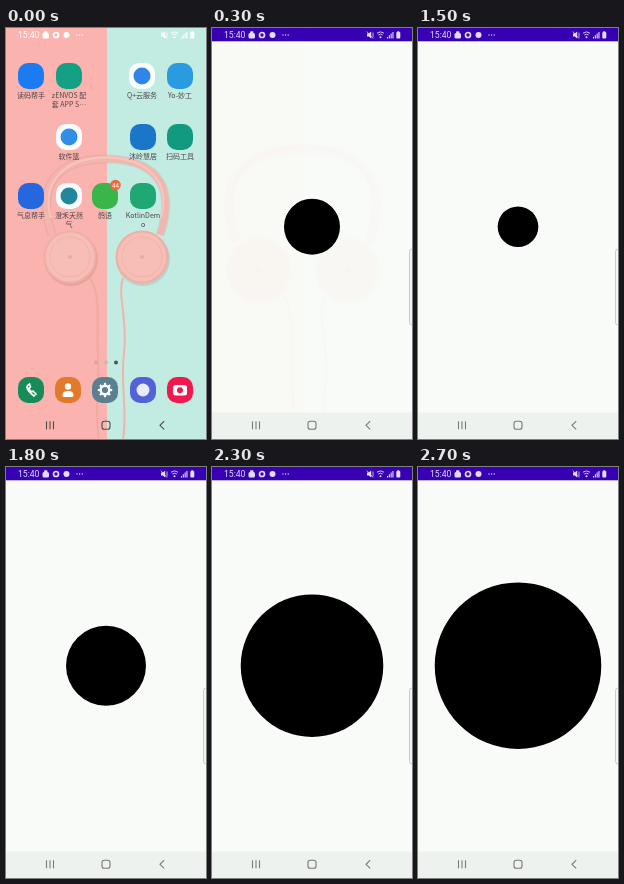
An HTML page with a canvas for the animation above (2.8 s loop, 200 px wide and 411 px high).

```html
<!DOCTYPE html>
<html lang="zh">
<head>
<meta charset="utf-8">
<title>Growing circle</title>
<style>
  html, body { margin: 0; width: 100%; height: 100%; overflow: hidden; background: #f8faf8; }
  canvas { display: block; width: 200px; height: 411px; }
</style>
</head>
<body>
<canvas id="stage"></canvas>
<script>
const W = 200, H = 411, LOOP = 2800, STEP = 100;
const SANS = '"Noto Sans CJK SC", "Noto Sans CJK", Roboto, sans-serif';
const canvas = document.getElementById('stage');
const ratio = window.devicePixelRatio || 1;
canvas.width = W * ratio;
canvas.height = H * ratio;
const g = canvas.getContext('2d');

// x, y, tile colour, colour of the round mark (if any), label lines
const APPS = [
  [25, 48, '#1b7cf2', null, ['读码帮手']],
  [63, 48, '#14a085', null, ['zENVOS 配', '套 APP S…']],
  [136, 48, '#fafcff', '#2f86e6', ['Q+云服务']],
  [174, 48, '#2a9be0', null, ['Yo-妙工']],
  [63, 109, '#fdfdfd', '#2f8fe8', ['软件篮']],
  [137, 109, '#1976c8', null, ['沐岭慧居']],
  [174, 109, '#129a80', null, ['扫码工具']],
  [25, 168, '#2467df', null, ['气息帮手']],
  [63, 168, '#f6fbfb', '#23869a', ['澄禾天然', '气']],
  [99, 168, '#39b54a', null, ['鸽语']],
  [137, 168, '#1fa873', null, ['KotlinDem', 'o']]
];

function box(x, y, w, h, r, color) {
  g.fillStyle = color;
  g.beginPath();
  g.roundRect(x, y, w, h, r);
  g.fill();
}

function disc(x, y, r, color) {
  g.fillStyle = color;
  g.beginPath();
  g.arc(x, y, r, 0, Math.PI * 2);
  g.fill();
}

function ring(x, y, r, color, width) {
  g.strokeStyle = color;
  g.lineWidth = width;
  g.beginPath();
  g.arc(x, y, r, 0, Math.PI * 2);
  g.stroke();
}

function line(d, color, width) {
  g.strokeStyle = color;
  g.lineWidth = width;
  g.stroke(new Path2D(d));
}

function text(s, x, y, size, color, align = 'center', font = SANS) {
  g.font = size + 'px ' + font;
  g.textAlign = align;
  g.textBaseline = 'alphabetic';
  g.fillStyle = color;
  g.fillText(s, x, y);
}

// Runs a drawing scaled about a point, with its own opacity.
function layer(scale, cx, cy, alpha, draw) {
  g.save();
  g.globalAlpha *= alpha;
  g.translate(cx, cy);
  g.scale(scale, scale);
  g.translate(-cx, -cy);
  draw();
  g.restore();
}

function wallpaper() {
  g.fillStyle = '#fab3ae';
  g.fillRect(0, 0, 101, H);
  g.fillStyle = '#c2ece2';
  g.fillRect(101, 0, 99, H);

  const arch = 'M46 207C27 151 58 131 100 131S173 151 154 207';
  line(arch, 'rgba(190,120,115,.18)', 9);
  line(arch, '#f3b6ae', 6.5);
  line('M45 190C34 151 62 129.5 100 129.5S166 151 155 190', '#f8c6bf', 2);
  line('M84 250C96 268 90 300 92 330S88 380 93 411', '#f0aaa4', 2);
  line('M117 250C111 268 122 290 118 325S122 380 117 411', '#f0b3ab', 2);
  for (const x of [64, 136]) {
    disc(x + 1, 231, 27, 'rgba(165,110,105,.22)');
    disc(x, 229, 26.5, '#efaea6');
    disc(x, 229, 24.5, '#f6beb6');
    ring(x, 229, 20, '#eeb0a9', .8);
    disc(x, 229, 2, '#eaa9a1');
  }
}

function tile(x, y, color) {
  box(x - 13, y - 13, 26, 26, 10, color);
}

function dock() {
  tile(25, 362, '#178c58');
  line('M22 357Q20 359 22 362T28 368L30 366L27 363L25.5 364Q23.5 362.5 23 360L24.5 359L23.5 356Z', '#fff', 1.6);

  tile(62, 362, '#e17a2b');
  disc(62, 358.5, 3.2, '#fff');
  box(56.5, 363, 11, 6, [5, 5, 2, 2], '#fff');

  tile(99, 362, '#5b7f91');
  ring(99, 362, 4.3, '#fff', 2.4);
  for (let i = 0; i < 8; i++) {
    const a = i * Math.PI / 4, c = Math.cos(a), s = Math.sin(a);
    line(`M${99 + 5 * c} ${362 + 5 * s}L${99 + 7.2 * c} ${362 + 7.2 * s}`, '#fff', 2.2);
  }

  tile(137, 362, '#5561d6');
  disc(137, 362, 6.5, '#e9ebff');

  tile(174, 362, '#f0184d');
  box(167, 357, 14, 10.5, 2.5, '#fff');
  disc(174, 362.2, 3, '#f0184d');
}

function launcher() {
  for (const [x, y, color, mark, lines] of APPS) {
    tile(x, y, color);
    if (mark) disc(x, y, 8.5, mark);
    lines.forEach((s, i) => text(s, x, y + 22 + i * 9, 7, '#4c4548'));
  }
  disc(109.5, 157, 5.3, '#f2683c');
  text('44', 109.5, 159.5, 6.5, '#fff');
  disc(90, 334.5, 1.9, '#d9a5a2');
  disc(100, 334.5, 1.9, '#c9b5b1');
  disc(110, 334.5, 2, '#4c5552');
  dock();
}

function statusIcons(color) {
  text('15:40', 12, 10, 8.6, color, 'left', 'Roboto, sans-serif');
  box(36.5, 5, 6.5, 5.5, 1.5, color);
  box(38, 3.3, 3.5, 2, 1, color);
  ring(50, 7, 2.5, color, 1.7);
  disc(60.5, 7, 3, color);
  for (const x of [71, 73.6, 76.2]) disc(x, 7, .65, color);

  g.fillStyle = color;
  g.fill(new Path2D('M155 5.5h1.8l2.4-2v7l-2.4-2H155z'));
  line('M154.8 3.5L161 10.5M161 4.5v5', color, .8);
  line('M165 5.2Q168.5 2.6 172 5.2M166.3 7Q168.5 5.4 170.7 7', color, .9);
  disc(168.5, 9.2, 1, color);
  for (let i = 0; i < 4; i++) box(175 + i * 1.8, 9 - i * 1.7, 1.1, 1.5 + i * 1.7, 0, color);
  box(184.3, 4, 4, 6.5, 1, color);
  box(185.4, 3.2, 1.8, 1, 0, color);
}

function navIcons(color) {
  for (const x of [40.5, 44, 47.5]) line(`M${x} 393.3v8`, color, 1.1);
  g.strokeStyle = color;
  g.lineWidth = 1.1;
  g.beginPath();
  g.roundRect(96, 393.3, 8, 8, 2.3);
  g.stroke();
  line('M158.2 393.2L154 397.3L158.2 401.4', color, 1.1);
}

function edgeHandle() {
  box(197.5, 221, 6, 76, 2.5, '#f3f5f4');
  g.strokeStyle = '#bcc1be';
  g.lineWidth = .8;
  g.beginPath();
  g.roundRect(197.5, 221, 6, 76, 2.5);
  g.stroke();
}

function appPage() {
  g.fillStyle = '#f9fbf8';
  g.fillRect(0, 0, W, H);
  g.fillStyle = '#eef2ef';
  g.fillRect(0, 384.5, W, H);
  g.fillStyle = '#3700b3';
  g.fillRect(0, 0, W, 13.3);
}

const dot = (r, color = '#000') => disc(100, 198.7, r, color);

function home() {
  wallpaper();
  launcher();
  statusIcons('#fff');
  navIcons('#4d4d4d');
}

// The app window grows over the zooming home screen.
function opening({ x, y, scale, alpha, ink, icons }) {
  g.fillStyle = '#fff';
  g.fillRect(0, 0, W, H);
  layer(1.235, 139, 175, .95, wallpaper);
  layer(1.415, 135, 181, icons, launcher);
  statusIcons('rgba(255,255,255,.85)');
  g.save();
  g.translate(x, y);
  g.scale(scale, scale);
  g.globalAlpha = alpha;
  appPage();
  g.globalAlpha = 1;
  dot(28, `rgba(0,0,0,${ink})`);
  g.restore();
  navIcons('#66606f');
  edgeHandle();
}

// Radius swings from nothing to full with a cosine ease.
function radius(t) {
  if (t < 1000) return 28;
  const u = Math.min(1, (t - 876) / 1901);
  return 83.6 * (1 - Math.cos(Math.PI * u)) / 2;
}

function app(t) {
  appPage();
  if (t < 1000) {
    g.save();
    g.beginPath();
    g.rect(0, 13.3, W, 371);
    g.clip();
    layer(1.235, 139, 175, .025, wallpaper);
    g.restore();
  }
  dot(radius(t));
  statusIcons('#e4dcf5');
  navIcons('#777a78');
  edgeHandle();
}

function frame(now) {
  const t = Math.floor((now % LOOP) / STEP) * STEP;
  g.setTransform(ratio, 0, 0, ratio, 0, 0);
  g.globalAlpha = 1;
  if (t < 100) home();
  else if (t < 200) opening({ x: 12, y: 16, scale: .91, alpha: .78, ink: .37, icons: .55 });
  else if (t < 300) opening({ x: 2.5, y: 3.5, scale: .98, alpha: .94, ink: .8, icons: .2 });
  else app(t);
}

let start;
function tick(now) {
  start ??= now;
  frame(now - start);
  requestAnimationFrame(tick);
}
frame(0);
requestAnimationFrame(tick);
</script>
</body>
</html>
```
